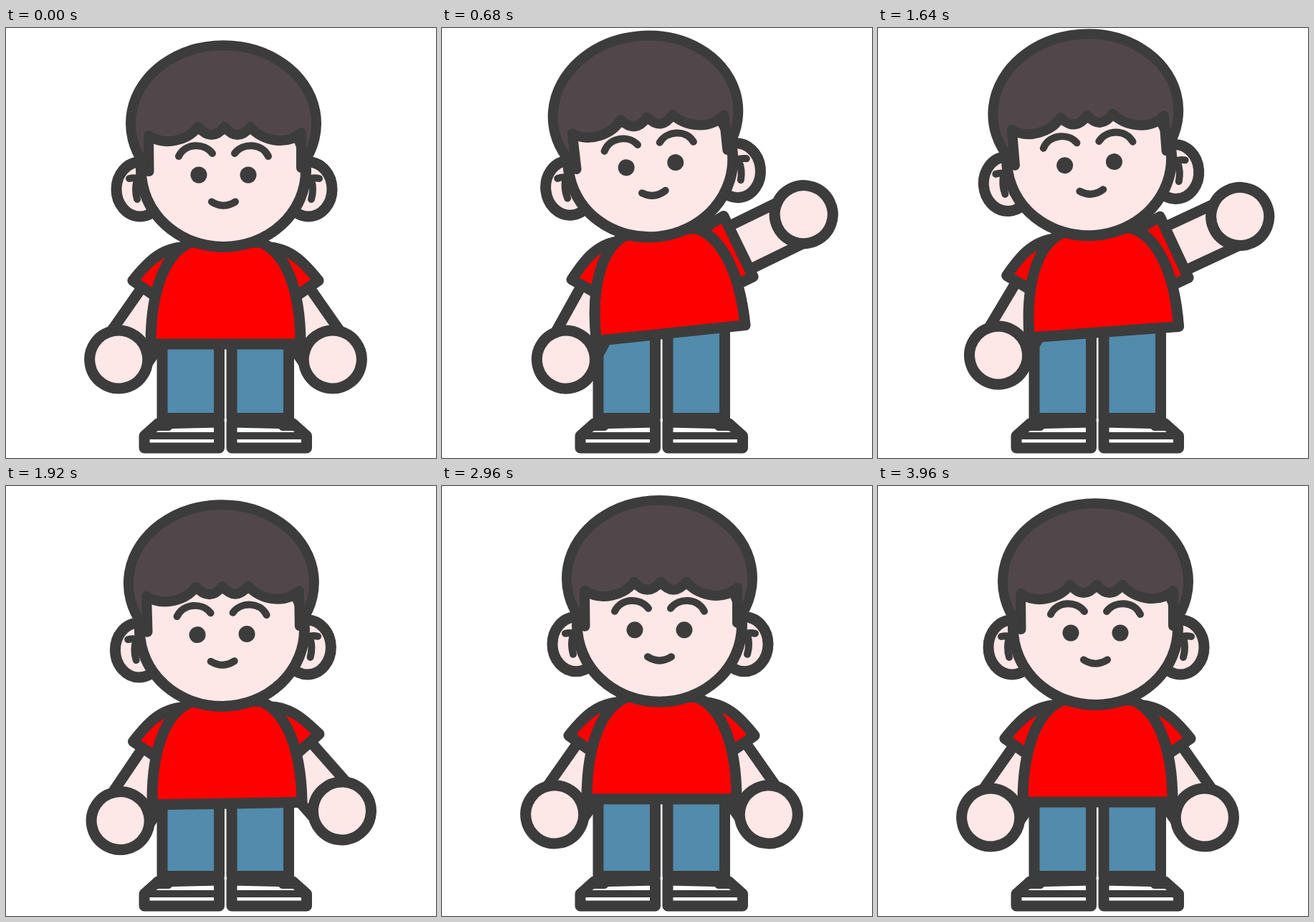
These frames come from a looping animation (600x600 px, 4040 ms). An HTML page:

```html
<!DOCTYPE html>
<html lang="en">
<head>
<meta charset="utf-8">
<title>Waving boy</title>
<style>
  html, body { margin: 0; width: 100%; height: 100%; overflow: hidden; background: #fff; }
  svg { display: block; width: 100vw; height: 100vh; }
  .ink { stroke: #3c3c3c; stroke-width: 15; stroke-linejoin: round; stroke-linecap: round; }
  .skin { fill: #fee7e7; }
  .shirt { fill: #f00; }
  .jeans { fill: #528bab; }
  .shoe { fill: #fbfffd; }
  .hair { fill: #51474a; }
  .thin { fill: none; stroke-width: 10; }
  .dot { fill: #3c3c3c; }
</style>
</head>
<body>
<svg viewBox="0 0 600 600">
  <defs>
    <g id="leg" class="ink">
      <path class="shoe" d="M212 552 L193 569 V586 H297.5 V550 Z"/>
      <path class="thin" d="M193 569 H297 M210 557 H227"/>
      <path class="jeans" d="M218 400 H297.5 V544.5 H218 Z"/>
    </g>
    <!-- Shoulder at the origin, arm along +x -->
    <g id="limb" class="ink">
      <path class="skin" d="M35 -31 H143 V36 H35 Z"/>
      <path class="shirt" d="M-38 -14 C-18 -42 13 -45 42 -47 V47 H0 Z"/>
      <circle class="skin" cx="143.5" r="40.5"/>
    </g>
    <g id="ear" class="ink">
      <ellipse class="skin" cx="187" cy="225" rx="33" ry="38"/>
      <path class="thin" d="M172 210 Q180 208 188 211 M183 212 Q179 225 183 239"/>
    </g>
    <g id="eye" class="ink">
      <circle class="dot" cx="269" cy="205" r="11.5" stroke="none" style="stroke-width:0"/>
      <path class="thin" d="M241 179 C250 160 277 160 288 175"/>
    </g>
  </defs>

  <use href="#leg"/>
  <use href="#leg" transform="translate(612.5) scale(-1 1)"/>

  <g id="body">
    <use href="#limb" transform="translate(613) scale(-1 1) translate(373.5 345) rotate(55)"/>
    <use href="#limb" id="arm"/>
    <path class="ink shirt" d="M202 441 C202 360 225 312 258 299 H355 C388 312 411 360 411 441 Z"/>

    <use href="#ear"/>
    <use href="#ear" transform="translate(609) scale(-1 1)"/>
    <ellipse class="ink skin" cx="303.5" cy="199" rx="115" ry="106.5"/>
    <path class="ink hair" style="stroke-width:14" d="M199.5 200 L193 190 A129.5 109 0 1 1 414 190
      L412 195 V146 C390 166 355 156 341 138 Q323 160 305 138
      Q287 160 268 138 C255 156 222 166 199 150 Z"/>
    <use href="#eye"/>
    <use href="#eye" transform="translate(607) scale(-1 1)"/>
    <path class="ink thin" d="M287 242.500 Q303.500 253 320 242.500"/>
  </g>
</svg>
<script>
  const LOOP = 4040, STEP = 40, LAST = 3960;
  const sine = p => (1 - Math.cos(Math.PI * p)) / 2;
  const cubicOut = p => 1 - (1 - p) ** 3;

  // Each key: time in ms, value, easing used to arrive there
  const tilt = [[0, 0], [480, -6], [1360, -6], [2120, 0], [LOOP, 0]];
  const lift = [[0, 0], [80, 1], [440, -17], [680, -14.6], [920, -15.4], [1160, -14.6],
                [1600, -17], [1920, 2], [2240, -2.9], [2800, -4.4], [LAST, 0], [LOOP, 0]];
  const swing = [[0, 55], [440, -40], [680, -20], [920, -40], [1160, -20], [1400, -40],
                 [1640, -20.8], [2120, 55, cubicOut], [LOOP, 55]];

  function valueAt(keys, time) {
    const next = keys.findIndex(key => key[0] > time);
    const [t0, v0] = keys[next - 1];
    const [t1, v1, ease = sine] = keys[next];
    return v0 + (v1 - v0) * ease((time - t0) / (t1 - t0));
  }

  const body = document.getElementById("body");
  const arm = document.getElementById("arm");
  const start = performance.now();

  function draw() {
    const elapsed = (performance.now() - start) % LOOP;
    const time = Math.min(LAST, Math.floor(elapsed / STEP) * STEP);
    body.setAttribute("transform",
      `translate(0 ${valueAt(lift, time)}) rotate(${valueAt(tilt, time)} 305 320)`);
    arm.setAttribute("transform", `translate(373.5 345) rotate(${valueAt(swing, time)})`);
    requestAnimationFrame(draw);
  }
  draw();
</script>
</body>
</html>
```
